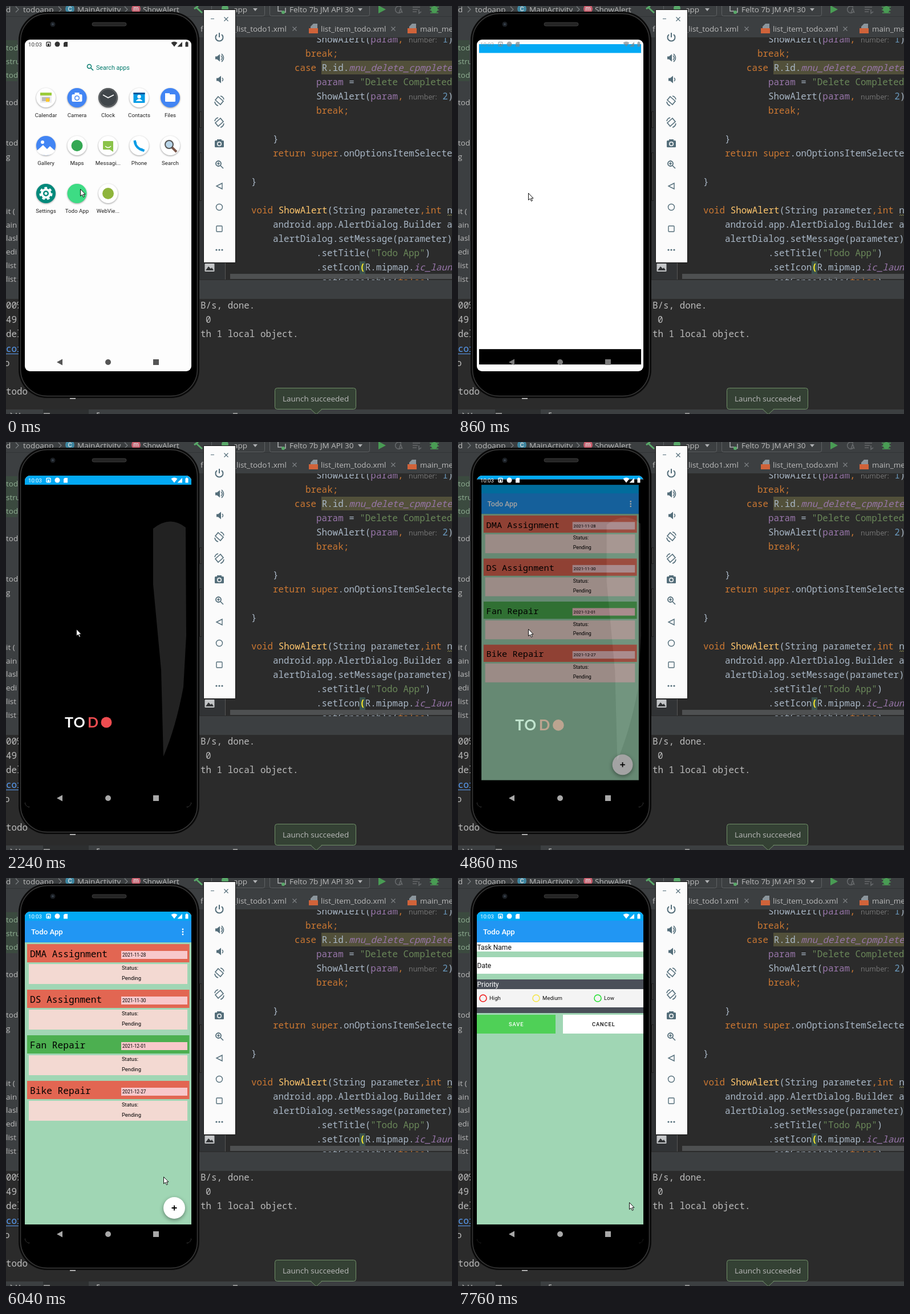
Recreate the animation shown at these times as an HTML page with a canvas. Size 782 by 716 pixels, loop 8000 ms.

```html
<!DOCTYPE html>
<html lang="en">
<head>
<meta charset="utf-8">
<title>Todo App</title>
<style>
  html, body { margin: 0; width: 100%; height: 100%; overflow: hidden; background: #2b2b2b; }
  canvas { display: block; }
</style>
</head>
<body>
<canvas id="stage" width="782" height="716"></canvas>
<script>
const LOOP = 8000, W = 782, H = 716;
const stage = document.getElementById('stage').getContext('2d');
const buffer = Object.assign(document.createElement('canvas'), { width: W, height: H }).getContext('2d');
let g = stage;

const UI = '13.5px "Open Sans", sans-serif';
const HINT = '12.4px "Open Sans", sans-serif';
const MONO = '15.9px "Noto Sans Mono", monospace';
const roboto = (size, weight = 400) => `${weight} ${size}px Roboto, sans-serif`;

const ticks = [[0, 1], [120, 1], [500, 4], [1010, 2], [1490, 1], [1760, 1], [2000, 1], [2240, 1], [4860, 1],
  [5010, 3], [5530, 3], [5920, 2], [6190, 5], [6920, 7], [7760, 1]]
  .flatMap(([start, n]) => Array.from({ length: n }, (_, i) => start + i * 120));

const clamp = v => Math.max(0, Math.min(1, v));
const lerp = (a, b, u) => a + (b - a) * u;
const easeOut = (t, start, duration) => 1 - (1 - clamp((t - start) / duration)) ** 3;

// Drawing helpers
function rect(x, y, w, h, color) { g.fillStyle = color; g.fillRect(x, y, w, h); }
function disc(x, y, r, color) { g.fillStyle = color; g.beginPath(); g.arc(x, y, r, 0, 7); g.fill(); }
function ring(x, y, r, color, width = 1.5) {
  g.strokeStyle = color; g.lineWidth = width; g.beginPath(); g.arc(x, y, r, 0, 7); g.stroke();
}
function box(x, y, w, h, r, fill, stroke, width = 1) {
  g.beginPath(); g.roundRect(x, y, w, h, r);
  if (fill) { g.fillStyle = fill; g.fill(); }
  if (stroke) { g.strokeStyle = stroke; g.lineWidth = width; g.stroke(); }
}
function shape(d, fill, x = 0, y = 0) {
  g.save(); g.translate(x, y); g.fillStyle = fill; g.fill(new Path2D(d)); g.restore();
}
function line(d, color, width = 1.5, x = 0, y = 0) {
  g.save(); g.translate(x, y); g.strokeStyle = color; g.lineWidth = width; g.stroke(new Path2D(d)); g.restore();
}
function text(s, x, y, font, color, align = 'left', spacing = 0) {
  g.font = font; g.fillStyle = color; g.textAlign = align; g.letterSpacing = spacing + 'px';
  g.fillText(s, x, y);
  return g.measureText(s).width;
}
function clipped(x, y, w, h, r, draw) {
  g.save(); g.beginPath(); g.roundRect(x, y, w, h, r); g.clip(); draw(); g.restore();
}
// Draws a whole screen as one translucent layer, scaled about the window centre.
function layer(draw, scale, alpha) {
  buffer.setTransform(1, 0, 0, 1, 0, 0);
  buffer.clearRect(0, 0, W, H);
  buffer.translate(179, 350); buffer.scale(scale, scale); buffer.translate(-179, -350);
  g = buffer; draw(); g = stage;
  g.globalAlpha = alpha; g.drawImage(buffer.canvas, 0, 0); g.globalAlpha = 1;
}

// Editor behind the phone
const ink = { d: '#a9b7c6', k: '#cc7832', s: '#6a8759', f: '#9876aa', i: '#9876aa', n: '#6897bb', y: '#ffc66d', h: '#787878', b: '#ffef28' };
const code = [
  [0, 544, 'd:ShowAlert(', 'f:param', 'k:, ', 'h:number:', 'n: 1', 'd:)'],
  [1, 525, 'k:break;'],
  [2, 506, 'k:case ', 'd:R.id.', 'i:mnu_delete_cpmpleted'],
  [3, 544, 'f:param', 'd: = ', 's:"Delete Completed"'],
  [4, 544, 'd:ShowAlert(', 'f:param', 'k:, ', 'h:number:', 'n: 2', 'd:)'],
  [5, 544, 'k:break;'],
  [7, 468, 'd:}'],
  [8, 468, 'k:return super', 'd:.onOptionsItemSelected'],
  [10, 430, 'd:}'],
  [12, 430, 'k:void ', 'y:ShowAlert', 'd:(String parameter', 'k:,int ', 'd:n'],
  [13, 468, 'd:android.app.AlertDialog.Builder a'],
  [14, 468, 'd:alertDialog.setMessage(parameter)'],
  [15, 544, 'd:.setTitle(', 's:"Todo App"', 'd:)'],
  [16, 544, 'd:.setIcon', 'b:(', 'd:R.mipmap.', 'i:ic_launcher'],
  [17, 544, 'd:.setCancelable(', 'k:false', 'd:)'],
];

function drawCode() {
  rect(553, 96, 229, 24, '#52503a');
  rect(620, 448, 10, 23, '#3b514d');
  for (const [row, x0, ...tokens] of code) {
    let x = x0;
    for (const token of tokens) {
      const kind = token[0];
      const font = kind === 'h' ? HINT : (kind === 'i' ? 'italic ' : kind === 'b' ? 'bold ' : '') + MONO;
      x += text(token.slice(2), x, 64 + 25 * row, font, ink[kind]);
    }
  }
  line('M774 368l2-2 2 2 2-2 2 2', '#8a8a50', 1);
  rect(393, 470, 389, 9, 'rgba(85,87,89,.85)');
}

function closeMark(x, y, color = '#7d8184') { line('M-3.5-3.5l7 7M3.5-3.5l-7 7', color, 1.2, x, y); }
function comboArrow(x) { shape('M-4-2h8l-4 5z', '#afb1b3', x, 6); }
function fileIcon(x) {
  shape('M3 5l5-5h7v9H3z', '#8b959c', x, 31);
  rect(x, 39, 16, 9, '#d0633a');
}

function drawIde() {
  rect(0, 0, W, H, '#2b2b2b');
  rect(0, 0, W, 55, '#3c3f41');
  rect(0, 18, W, 1, '#323436');
  rect(0, 20, 22, 460, '#3c3f41');
  rect(0, 60, 20, 72, '#3b4a3f');
  rect(340, 55, 45, 425, '#313335');
  rect(384, 55, 1, 425, '#555');

  text('d', 0, 11, UI, '#bbb');
  text('todoapp', 30, 11, UI, '#bbb');
  text('MainActivity', 125, 11, UI, '#bbb');
  text('ShowAlert', 240, 11, UI, '#bbb');
  for (const x of [17, 92, 208]) line('M0 1l5 5-5 5', '#7d8184', 1.2, x, 0);
  disc(112, 5, 8, '#3e86a0'); text('C', 112, 9, roboto(11, 500), '#ddd', 'center');
  disc(228, 5, 8, '#c75f6e'); text('m', 228, 8, roboto(11, 500), '#ddd', 'center');
  line('M333 2l11 10M330 5l7-5', '#59a869', 3);

  box(360.5, -11.5, 93, 29, 3, null, '#5e6163');
  disc(384, 4, 6, '#59a869');
  text('app', 399, 11, UI, '#bbb'); comboArrow(437);
  box(462.5, -11.5, 175, 29, 3, null, '#5e6163');
  line('M477 0v9h7M485 11h5V3', '#afb1b3', 1.5); disc(486, 11, 3, '#59a869');
  text('Felto 7b JM API 30', 497, 11, UI, '#bbb'); comboArrow(621);
  shape('M653-1l13 7-13 7z', '#499c54');
  line('M693 2a6 6 0 1 0 1 7M689 12l3-8 3 8', '#65686a', 1.6);
  line('M713 2h13M713 6h9M713 10h7M724 6v7l4-3', '#65686a', 1.6);
  disc(751, 6, 6, '#499c54'); line('M743 2h16M743 7h16M744 12h14', '#499c54', 1.5);

  text('f', 341, 45, UI, '#bbb');
  text('_list_todo1.xml', 398, 45, UI, '#bbb'); closeMark(506, 40);
  fileIcon(531); text('list_item_todo.xml', 552, 45, UI, '#bbb'); closeMark(679, 40);
  fileIcon(704); text('main_menu.xml', 726, 45, UI, '#bbb');

  clipped(385, 56, 397, 425, 0, drawCode);
  box(348.5, 452, 17, 14, 1, '#c4c6c8'); shape('M350 464l5-7 4 4 2-2 3 5z', '#313335');

  rect(0, 481, W, 33, '#3c3f41');
  [['tod', 73], ['stru', 97], ['tod', 121], ['tod', 169], ['tod', 240], ['g', 264], ['it (', 360],
    ['ain', 384], ['lasl', 407], ['edi', 431], ['list', 455], ['list', 479]]
    .forEach(([s, y]) => text(s, 0, y + 5, UI, y < 130 ? '#8fae92' : '#bbb'));
  [['00%', 531], ['49)', 556], ['del', 581], ['o', 632], ['todo', 682]]
    .forEach(([s, y]) => text(s, s === 'o' ? -3 : 0, y, MONO, '#bbb'));
  text('cor', 0, 607, MONO, '#589df6'); rect(0, 610, 22, 1, '#589df6');
  text('B/s, done.', 341, 531, MONO, '#bbb');
  text('0', 350, 556, MONO, '#bbb');
  text('th 1 local object.', 341, 581, MONO, '#bbb');

  rect(0, 708, W, 8, '#3c3f41');
  rect(65, 708, 80, 8, '#2d2f30');
  line('M8 714l4 4M18 714v3M24 714v3M66 715h11M164 714h-4v3M398 715h8', '#aaa', 1.5);
  rect(112, 688, 10, 1.5, '#ddd');
  box(471.5, 670.5, 142, 37, 4, '#344134', '#708f68');
  shape('M534 706h20l-10 11z', '#344134'); line('M534 707.500l10 9 10-9', '#708f68', 1);
  text('Launch succeeded', 485, 694, UI, '#bbb');
}

function drawToolPanel() {
  const c = '#546e7a';
  box(346.5, 6.5, 56, 444, 0, '#fbfbfb', '#111');
  rect(359, 22, 6, 1, c); closeMark(386, 23, c);
  line('M-4-5a6.500 6.500 0 1 0 8 0M0-8v8', c, 2, 374, 55);
  for (const [y, x] of [[91, 373], [129, 375]]) shape('M-6-2.500h3l5-4v13l-5-4h-3z', c, x, y);
  line('M377 87q4 4 0 8M378 84q7 7 0 14', c, 1.5);
  line('M379 126q3 3 0 6', c, 1.5);
  for (const [y, side] of [[166, 1], [204, -1]]) {
    g.save(); g.translate(374, y); g.scale(side, 1);
    line('M-2-7l9 8-5 6-9-8zM-8 2q1 6 6 7M2-8q5 1 6 6', c, 1.6);
    g.restore();
  }
  box(366, 236, 16, 12, 1.5, c); rect(370, 234, 8, 3, c);
  disc(374, 242, 4, '#fbfbfb'); disc(374, 242, 2.5, c);
  ring(372.5, 276.5, 4.5, c, 1.8); line('M376 280l5 5M370 276.500h5M372.500 274v5', c, 1.6);
  line('M379 311v10l-10-5z', c, 1.4);
  ring(374, 353, 5.5, c, 1.4);
  box(369, 386, 10, 10, 1, null, c, 1.4);
  for (const x of [369, 374, 379]) disc(x, 428, 1.6, c);
}

function drawPhone() {
  rect(338, 185, 5, 29, '#1c1c1c'); rect(338, 257, 5, 85, '#1c1c1c');
  rect(341, 186, 1, 27, '#555'); rect(341, 258, 1, 83, '#555');
  box(22, 10, 317, 678, 50, '#0a0a0a');
  box(25.5, 13.5, 310, 671, 47, '#000', '#3a3a3a', 1.5);
  box(151, 29, 60, 6, 3, '#242424', '#3a3a3a');
  disc(82, 32, 4.5, '#1b1f24'); disc(82, 32, 1.8, '#3a4450');
}

// Phone screens
function appBars() {
  rect(33, 59, 292, 17, '#03a9f4');
  rect(33, 75, 292, 38, '#2196f3');
  rect(33, 113, 292, 495, '#a0d6b4');
  rect(33, 608, 292, 33, '#000');
  text('Todo App', 44, 99, roboto(13.2, 500), '#fff');
}

function shadowDisc(x, y, r, color, blur = 3) {
  g.save(); g.shadowColor = 'rgba(0,0,0,.4)'; g.shadowBlur = blur; g.shadowOffsetY = blur / 3;
  disc(x, y, r, color); g.restore();
}

const apps = [
  ['Calendar', '#fff', () => { rect(-10, -9, 20, 18, '#eee'); rect(-10, -9, 20, 5, '#9ccc3c'); rect(-7, -1, 14, 7, '#bbb'); rect(0, 1, 6, 6, '#ffc928'); }],
  ['Camera', '#4285f4', () => { box(-9, -6, 18, 13, 2, '#fff'); rect(-4, -9, 8, 4, '#fff'); disc(0, 0.5, 4.5, '#4285f4'); disc(0, 0.5, 3, '#fff'); }],
  ['Clock', '#40464a', () => { ring(0, 0, 15.5, '#777', 1); line('M-9-5L0 0 10-5', '#fff', 1.7); }],
  ['Contacts', '#fff', () => { box(-10, -9, 20, 18, 1, '#039be5'); rect(-10, -9, 20, 3, '#01579b'); disc(0, -2, 3.2, '#fff'); shape('M-6 6q6-8 12 0z', '#fff'); }],
  ['Files', '#4285f4', () => { box(-9, -6, 18, 13, 1.5, '#fff'); rect(-9, -8, 8, 4, '#fff'); }],
  ['Gallery', '#4285f4', () => { disc(-6, -6, 3, '#fff'); shape('M-16 9L-5-1 2 6 7 1 16 9Q11 17 0 17T-16 9z', '#fff'); }],
  ['Maps', '#fff', () => disc(0, 0, 10, '#34a853')],
  ['Messagi...', '#fff', () => { box(-9, -8, 18, 15, 1, '#8bc34a'); shape('M3 7h6v4z', '#8bc34a'); line('M-5 1q5 5 10 0', '#fff', 1.5); }],
  ['Phone', '#fff', () => line('M-8-9q1 14 17 18M-8-9l2 6M9 9l-6-3', '#039be5', 4)],
  ['Search', '#fff', () => { line('M3 3l8 8', '#795548', 4); disc(-2, -2, 7, '#b9d5e8'); ring(-2, -2, 7, '#555', 2); }],
  ['Settings', '#00897b', () => { g.setLineDash([4.5, 3.9]); ring(0, 0, 9.5, '#fff', 4); g.setLineDash([]); ring(0, 0, 7, '#fff', 4); disc(0, 0, 3.5, '#00897b'); disc(0, 0, 2.5, '#fff'); }],
  ['Todo App', '#3ddc84', () => {}],
  ['WebVie...', '#fff', () => disc(0, 0, 10, '#8fb53c')],
];

function launcher() {
  ring(146, 106, 3.5, '#00796b'); line('M149 109l4 4', '#00796b', 1.6);
  text('Search apps', 158, 112, roboto(10.7), '#00796b');
  apps.forEach(([name, color, icon], i) => {
    const x = 70 + (i % 5) * 54.5, y = 161 + Math.floor(i / 5) * 84;
    shadowDisc(x, y, 17, color);
    g.save(); g.translate(x, y); icon(); g.restore();
    text(name, x, y + 34, roboto(9.7), '#222', 'center');
  });
}

function launchWindow(p) {
  const x = lerp(147, 33, p), y = lerp(288, 59, p);
  const right = lerp(211, 325, p), bottom = lerp(298, 641, p);
  const navTop = Math.min(bottom, lerp(440, 608, p));
  rect(x, y, right - x, bottom - y, '#fff');
  rect(x, y, right - x, 16 * p, '#03a9f4');
  rect(x, navTop, right - x, bottom - navTop, '#000');
}

function splash() {
  rect(33, 59, 292, 16, '#03a9f4');
  rect(33, 75, 292, 566, '#000');
  shape('M258 152Q288 128 315 150L316 340 311 430Q298 500 276 552L272 400 258 250z', '#222');
  const font = '700 25px Lato, sans-serif';
  text('TO', 103, 501, font, '#fff', 'left', 1);
  text('D', 143, 501, font, '#ee4c50');
  disc(176, 492, 9.5, '#ee4c50');
}

const todos = [['DMA Assignment', '2021-11-28'], ['DS Assignment', '2021-11-30'], ['Fan Repair', '2021-12-01'], ['Bike Repair', '2021-12-27']];

function todoList(press) {
  appBars();
  for (const y of [90, 94.5, 99]) disc(310, y, 1.4, '#fff');
  todos.forEach(([name, date], i) => {
    const y = i * 80;
    rect(37, 116 + y, 284.500, 32, i === 2 ? '#4caf50' : '#e26652');
    rect(202, 128 + y, 116, 14, '#f8c8cb');
    rect(40, 151 + y, 278, 35, '#f3d9d2');
    text(name, 42, 139 + y, '16.2px "Noto Sans Mono", monospace', '#000');
    text(date, 204, 138 + y, roboto(8.2), '#000');
    text('Status:', 203, 161 + y, roboto(9.4), '#000');
    text('Pending', 203, 178.500 + y, roboto(9.4), '#000');
  });
  shadowDisc(295, 579, 19, '#fff', 7);
  if (press) disc(295, 579, 19 * press, 'rgba(0,0,0,.1)');
  line('M290.500 579h9M295 574.500v9', '#000', 1.8);
}

function taskForm() {
  appBars();
  rect(33, 113, 292, 16, '#fff');
  rect(33, 139, 292, 29, '#fff');
  rect(33, 178, 292, 59, '#4a4f58');
  rect(33, 195, 292, 32, '#f4f4f4');
  text('Task Name', 33.500, 126, roboto(12), '#111');
  text('Date', 33.500, 158, roboto(12), '#111');
  text('Priority', 33.500, 191, roboto(12), '#fff');
  [['High', 44, '#f01414'], ['Medium', 137, '#f5e642'], ['Low', 245, '#1fe02c']].forEach(([name, x, color]) => {
    ring(x, 211, 6, color);
    text(name, x + 11, 214, roboto(9.6), '#111');
  });
  rect(33, 240, 138, 33, '#4fd057');
  rect(184, 240, 141, 33, '#fff');
  text('SAVE', 89, 260, roboto(9.3, 500), '#fff', 'left', 0.9);
  text('CANCEL', 235, 260, roboto(9.3, 500), '#111', 'left', 0.9);
}

// The entering screen grows and fades in while the leaving one swells slightly.
function transition(from, to, p) {
  if (p < 1) layer(from, 1 + 0.055 * p, 1);
  if (p > 0) layer(to, 0.85 + 0.15 * p, clamp(1.22 * p - 0.13));
}

function systemIcons(color, navColor) {
  text('10:03', 39, 70.500, roboto(9.6), color);
  box(71, 63.500, 7, 7, 1, null, color, 1.4); rect(73, 66, 3, 4, color);
  disc(90, 67, 4.5, color);
  shape('M103 63h5v8.500h-7v-6.500z', color);
  shape('M289.500 64.500q5.500-4 11 0l-5.500 7z', color);
  shape('M309 63v8.500h-8.500z', color);
  box(314.500, 63.500, 5, 8, 0.5, color); rect(316, 62.500, 2, 1.5, color);
  shape('M99 619.500v11l-10-5.500z', navColor);
  disc(179, 625, 5, navColor);
  rect(258, 620, 10, 10, navColor);
}

function drawScreen(t) {
  rect(33, 59, 292, 582, '#fdfdfd');
  if (t < 1130) {
    const p = easeOut(t, 400, 683) * (t >= 500);
    if (p < 0.9) layer(launcher, 1, 1 - p / 0.9);
    if (p) layer(() => launchWindow(p), 1, clamp(p * 1.3));
  } else if (t < 4860) {
    splash();
  } else if (t < 7400) {
    const press = t < 6920 ? 0 : clamp((t - 6800) / 360);
    transition(splash, () => todoList(press), easeOut(t, 4733, 450));
  } else {
    transition(() => todoList(0), taskForm, easeOut(t, 7338, 450));
  }
  const grey = Math.round(lerp(85, 168, Math.sqrt(clamp((t - 500) / 1740))));
  const statusColor = t < 500 ? '#333' : t < 1010 ? 'rgba(125,135,140,.7)' : '#fff';
  systemIcons(statusColor, `rgb(${grey},${grey},${grey})`);
}

const pointerPath = [[5410, 123, 328], [5770, 248, 485], [6040, 276, 524], [6670, 300, 569]];

function drawPointer(t) {
  let [, x, y] = t < 120 ? [0, 130, 321] : pointerPath[0];
  for (let i = 1; i < pointerPath.length; i++) {
    const [t0, x0, y0] = pointerPath[i - 1], [t1, x1, y1] = pointerPath[i];
    if (t > t0) {
      const u = clamp((t - t0) / (t1 - t0));
      x = lerp(x0, x1, u); y = lerp(y0, y1, u);
    }
  }
  const arrow = 'M.5 .5v12l3-2.500 2 4.500 2-1-2-4.200h3.500z';
  shape(arrow, '#fff', x, y); line(arrow, '#111', 1, x, y);
}

function frame(now) {
  const time = now % LOOP;
  const t = ticks.findLast(tick => tick <= time) ?? 0;
  drawIde();
  drawPhone();
  drawToolPanel();
  clipped(33, 59, 292, 582, 9, () => drawScreen(t));
  drawPointer(t);
  requestAnimationFrame(frame);
}
requestAnimationFrame(frame);
</script>
</body>
</html>
```
